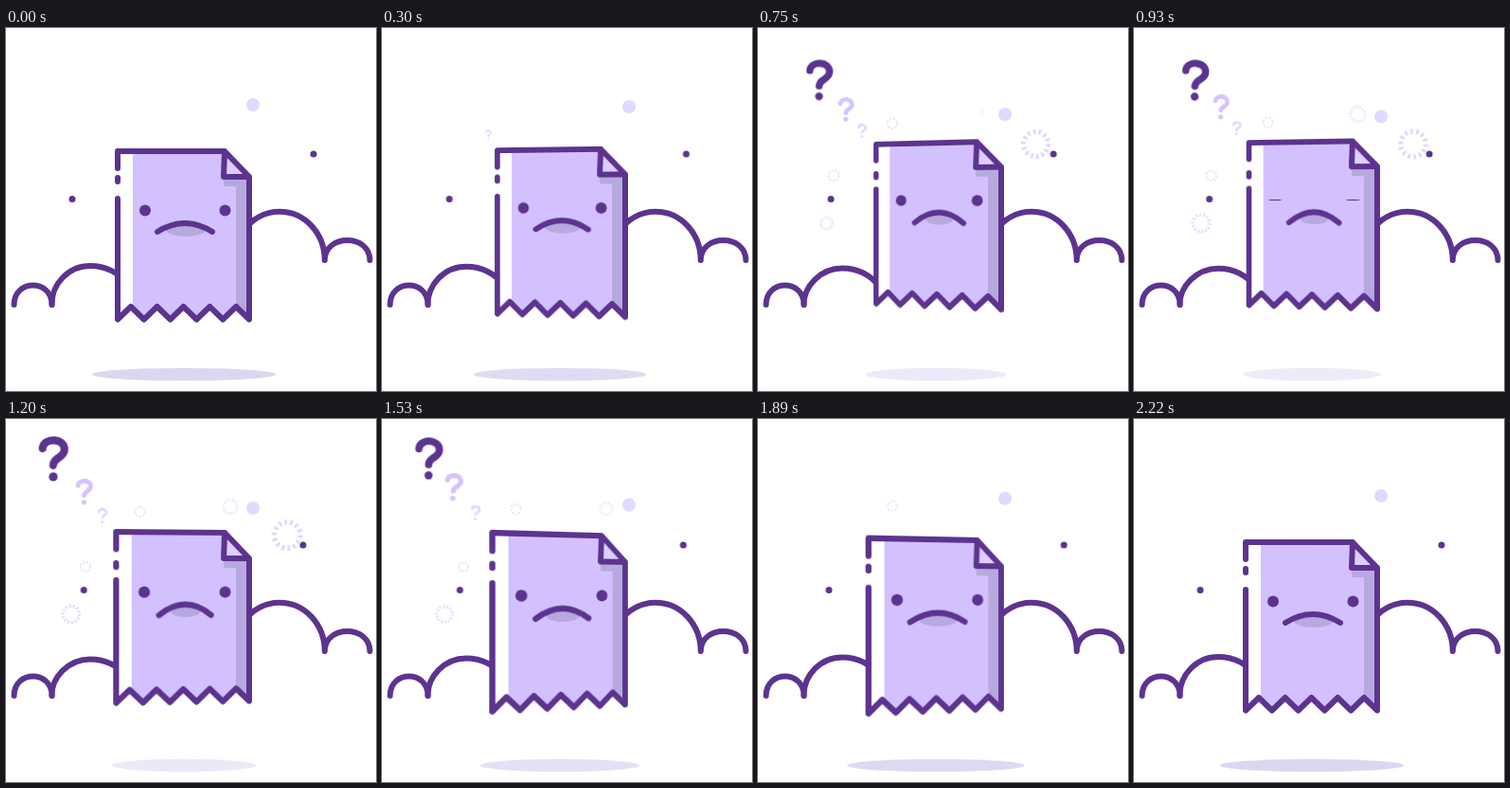
These frames come from a looping animation (391 px wide and 383 px high, 2.25 s). An HTML page:

```html
<!DOCTYPE html>
<html lang="en">
<head>
<meta charset="utf-8">
<title>Sad paper</title>
<style>
  html, body { margin: 0; width: 100%; height: 100%; overflow: hidden; background: #fff; }
  svg, .lift { position: absolute; left: 0; top: 0; width: 391px; height: 383px; }
  svg { overflow: visible; fill: none; stroke-linecap: round; stroke-linejoin: round; }
  .ink { stroke: #5c338f; stroke-width: 6; }
  .dark { fill: #5c338f; }
  .shade { fill: #b6a9de; }
  .swing, .lift { animation: 2250ms ease-in-out infinite; }
  .pop { animation: 2250ms linear infinite; }

  /* paper */
  .lift { animation-name: lift; }
  @keyframes lift { 40% { transform: translateY(-11px); } }
  .turn { transform-origin: 257px 191px; animation-name: turn; }
  @keyframes turn {
    0%, 100% { transform: perspective(300px) rotateY(0deg); }
    27% { transform: perspective(300px) rotateY(-7.4deg); }
    73% { transform: perspective(300px) rotateY(7.9deg); }
  }
  .stretch { transform-origin: 257px 191px; animation-name: stretch; }
  @keyframes stretch {
    0%, 100% { transform: scaleX(1); }
    41% { transform: scaleX(1.012); }
    73% { transform: scaleX(.957); }
  }
  .dash { animation-name: dash; }
  @keyframes dash { 40% { transform: translateY(5px); } }
  .mouth { d: path("M160 215Q189 197 218 215"); animation-name: frown; }
  @keyframes frown { 40% { d: path("M162.5 216.8Q190 194 216.5 216.8"); } }
  .lip { transform-origin: 190px 213px; animation-name: lip; }
  @keyframes lip { 40% { transform: scale(.7, .8); } }
  .eye { transform-box: fill-box; transform-origin: center; animation-name: blink; }
  @keyframes blink {
    0%, 37.5%, 45%, 100% { transform: none; }
    40.5%, 42% { transform: scale(1.1, .13); }
  }

  /* surroundings */
  .hill { d: path("M48.5 292C48 270 66 251 89 251C105 251 119 258 129 271"); animation-name: hill; }
  @keyframes hill { 40% { d: path("M48.5 292C48 273 66 253.700 89 253.700C105 253.700 119 260.700 129 273.700"); } }
  .shadow { transform-origin: 188px 365px; animation-name: shadow; }
  @keyframes shadow { 40% { transform: scaleX(.753); opacity: .5; } }
  .left { animation-name: left; }
  @keyframes left { 63% { transform: translateX(12.8px); } }
  .top { animation-name: top; }
  @keyframes top { 50% { transform: translateY(13.2px); } }
  .right { animation-name: right; }
  @keyframes right { 37% { transform: translateX(-13px); } }

  /* question marks */
  .big { animation-name: big; }
  @keyframes big {
    0%, 17% { transform: translate(69px, 60px) rotate(-20deg) scale(0); }
    22% { transform: translate(65px, 55px) rotate(4deg) scale(1.02); }
    25.3% { transform: translate(65px, 55px) rotate(1deg) scale(.98); }
    41.3% { transform: translate(64.7px, 55.5px) rotate(3deg) scale(1); }
    46% { transform: translate(62px, 51px) rotate(2deg) scale(1.03); }
    50.5% { transform: translate(50px, 32px) rotate(0deg) scale(1.18); }
    53.3% { transform: translate(50px, 42.3px) rotate(1deg) scale(1.1); }
    68% { transform: translate(49.5px, 42px) rotate(2deg) scale(1.04); }
    72%, 100% { transform: translate(49.5px, 42px) rotate(2deg) scale(0); }
  }
  .mid { animation-name: mid; }
  @keyframes mid {
    0%, 13% { transform: translate(96px, 93px) rotate(-15deg) scale(0); }
    19% { transform: translate(94px, 90px) rotate(1deg) scale(.6); }
    25.3% { transform: translate(94px, 89px) rotate(1deg) scale(.58); }
    41.3% { transform: translate(92px, 83.5px) rotate(3deg) scale(.61); }
    53.3% { transform: translate(82.7px, 77px) rotate(2deg) scale(.64); }
    68% { transform: translate(75.6px, 72px) rotate(5deg) scale(.68); }
    72% { transform: translate(75px, 71px) rotate(5deg) scale(.68); }
    76%, 100% { transform: translate(75px, 71px) rotate(5deg) scale(0); }
  }
  .small { animation-name: small; }
  @keyframes small {
    0%, 10% { transform: translate(113px, 114px) rotate(-10deg) scale(0); }
    15% { transform: translate(112px, 112px) rotate(2deg) scale(.35); }
    25.3% { transform: translate(111.5px, 111px) rotate(2deg) scale(.34); }
    41.3% { transform: translate(108.5px, 106px) rotate(4deg) scale(.35); }
    53.3% { transform: translate(102px, 102px) rotate(3deg) scale(.37); }
    68% { transform: translate(99px, 99px) rotate(5deg) scale(.37); }
    75% { transform: translate(98px, 98px) rotate(5deg) scale(.37); }
    79%, 100% { transform: translate(98px, 98px) rotate(5deg) scale(0); }
  }

  /* rays */
  .many { stroke-dasharray: 12 13.714; }
  .few { stroke-dasharray: 17 23; }
  .r1 { animation-name: r1; }
  @keyframes r1 {
    0%, 13% { transform: translate(290px, 122.5px) scale(0); }
    22% { transform: translate(291.5px, 122.5px) scale(1); }
    55% { transform: translate(297.5px, 122.5px) scale(1.1); }
    64%, 100% { transform: translate(298px, 122.5px) scale(0); }
  }
  .r2 { animation-name: r2; }
  @keyframes r2 {
    0%, 31% { transform: translate(236px, 89px) scale(0); }
    38% { transform: translate(236px, 90.5px) scale(.62); }
    53% { transform: translate(237px, 92.5px) scale(.57); }
    68% { transform: translate(237px, 95px) scale(.5); opacity: .7; }
    75%, 100% { transform: translate(237px, 96px) scale(0); opacity: .7; }
  }
  .r3 { animation-name: r3; }
  @keyframes r3 {
    0%, 16% { transform: translate(75px, 155px) scale(0); }
    23% { transform: translate(78px, 155px) scale(.45); }
    41% { transform: translate(81.5px, 156px) scale(.42); }
    68% { transform: translate(86.3px, 156px) scale(.4); }
    76%, 100% { transform: translate(88px, 156px) scale(0); }
  }
  .r4 { animation-name: r4; }
  @keyframes r4 {
    0%, 28% { transform: translate(73px, 206px) scale(0); }
    36% { transform: translate(72px, 206px) scale(.72); }
    68% { transform: translate(66px, 206px) scale(.66); }
    77%, 100% { transform: translate(65px, 206px) scale(0); }
  }
  .r5 { animation-name: r5; }
  @keyframes r5 {
    0%, 14% { transform: translate(142px, 104px) scale(0); }
    21% { transform: translate(142px, 103px) scale(.43); }
    53% { transform: translate(141.5px, 98px) scale(.4); }
    84% { transform: translate(142px, 92px) scale(.41); }
    90%, 100% { transform: translate(142px, 91px) scale(0); }
  }
</style>
</head>
<body>
<svg viewBox="0 0 391 383">
  <defs>
    <g id="ask">
      <path d="M-10.5-10C-10-21 11-21 10.5-9C10.5-1 0-2 0 6" stroke="currentColor" stroke-width="7.5"/>
      <circle cx=".3" cy="17" r="4.2" fill="currentColor"/>
    </g>
    <circle id="rays" r="12.6" pathLength="360" stroke="#e0d7ff" stroke-width="5" stroke-linecap="butt"/>
  </defs>

  <ellipse class="swing shadow" cx="188" cy="365.5" rx="97.5" ry="6.7" fill="#dcd6f1"/>
  <g class="ink">
    <path d="M8.5 292C8.5 264.700 48.5 264.700 48.5 292"/>
    <path class="swing hill"/>
    <path d="M250 215C261 200 274 193.700 289 193.700C316 193.700 336.800 217 336.800 245C336.800 217 384.500 217 384.500 245"/>
  </g>

  <circle class="swing left dark" cx="70" cy="180.5" r="3.5"/>
  <circle class="swing top" cx="261" cy="81" r="7" fill="#e1d9ff"/>
  <circle class="swing right dark" cx="325" cy="133" r="3.5"/>

  <use class="pop many r1" href="#rays"/>
  <use class="pop many r2" href="#rays"/>
  <use class="pop few r3" href="#rays"/>
  <use class="pop many r4" href="#rays"/>
  <use class="pop few r5" href="#rays"/>

  <use class="pop big" href="#ask" color="#5c338f"/>
  <use class="pop mid" href="#ask" color="#d4c3ff"/>
  <use class="pop small" href="#ask" color="#e2d9ff"/>
</svg>

<div class="lift">
  <svg class="swing turn" viewBox="0 0 391 383">
    <defs>
      <clipPath id="sheet">
        <path d="M118 130H231L257 157V307.5l-13.9-13.5-13.9 13.5-13.9-13.5-13.9 13.5-13.9-13.5-13.9 13.5-13.9-13.5-13.9 13.5-13.9-13.5L118 307.5Z"/>
      </clipPath>
    </defs>
    <g class="swing stretch">
      <g clip-path="url(#sheet)">
        <path d="M118 130H257V308H118Z" fill="#fff"/>
        <path d="M134 130H257V308H134Z" fill="#d3c1ff"/>
        <path class="shade" d="M230 157H257V308H243V167H230Z"/>
      </g>
      <path d="M231 130L230 157H257Z" fill="#dccfff"/>
      <g class="ink">
        <path d="M118 148V130H231L257 157V307.5l-13.9-13.5-13.9 13.5-13.9-13.5-13.9 13.5-13.9-13.5-13.9 13.5-13.9-13.5-13.9 13.5-13.9-13.5L118 307.5V180M231 130L230 157H257"/>
        <path class="swing dash" d="M118 158V162"/>
      </g>
      <ellipse class="swing lip shade" cx="190" cy="213" rx="21" ry="7"/>
      <path class="swing mouth ink"/>
      <circle class="swing eye dark" cx="147" cy="192.5" r="6"/>
      <circle class="swing eye dark" cx="231.5" cy="192.5" r="6"/>
    </g>
  </svg>
</div>
</body>
</html>
```
